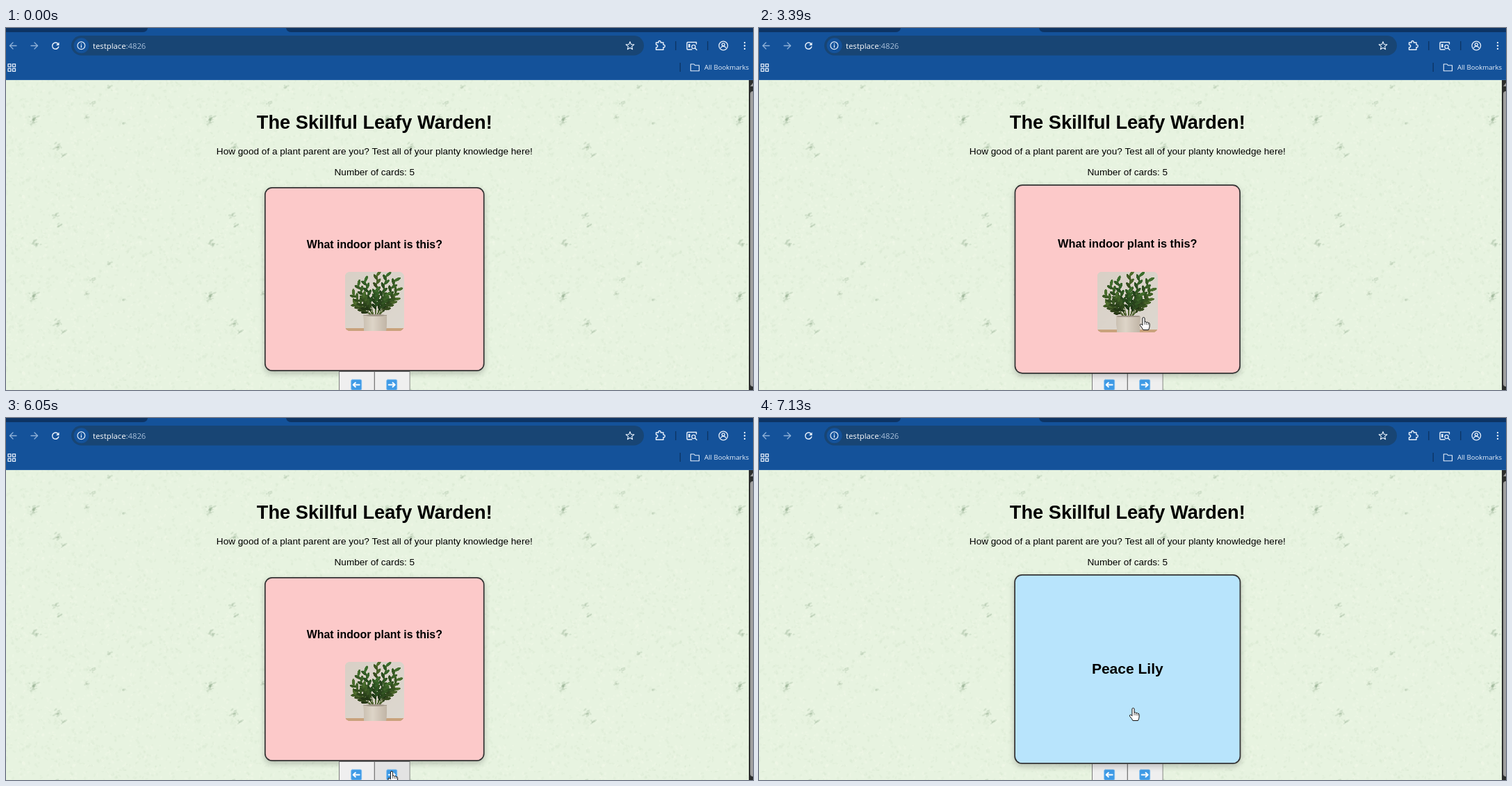
Recreate the animation shown at these times as an HTML page with a canvas. Size 1075 px wide and 521 px high, loop 8000 ms.

```html
<!DOCTYPE html>
<html lang="en">
<head>
<meta charset="utf-8">
<title>Plant quiz</title>
<style>
html, body { margin: 0; width: 100%; height: 100%; overflow: hidden; background: #e7f3e0; }
canvas { display: block; width: 1075px; height: 521px; }
</style>
</head>
<body>
<canvas id="stage" width="1075" height="521"></canvas>
<script>
const W = 1075, H = 521, LOOP = 8000, TAU = Math.PI * 2;
const SANS = '"Liberation Sans", Arial, sans-serif';
const UI = '"Open Sans", "Noto Sans", sans-serif';
const stage = document.getElementById('stage').getContext('2d');
let g = stage;

function seeded(seed) {
  return () => {
    seed = (seed * 1664525 + 1013904223) >>> 0;
    return seed / 4294967296;
  };
}
function layer(w, h, draw) {
  const c = document.createElement('canvas');
  c.width = w; c.height = h;
  const prev = g;
  g = c.getContext('2d');
  draw();
  g = prev;
  return c;
}
function rect(x, y, w, h, fill) { g.fillStyle = fill; g.fillRect(x, y, w, h); }
function roundPath(x, y, w, h, r) { g.beginPath(); g.roundRect(x, y, w, h, r); }
function ellipse(x, y, rx, ry, rot, fill) {
  g.beginPath();
  g.ellipse(x, y, rx, ry, rot, 0, TAU);
  g.fillStyle = fill;
  g.fill();
}
function line(color, width, ...pts) {
  g.beginPath();
  for (let i = 0; i < pts.length; i += 2) g.lineTo(pts[i], pts[i + 1]);
  g.strokeStyle = color; g.lineWidth = width;
  g.stroke();
}
function ring(x, y, r, color, width, from = 0, to = TAU) {
  g.beginPath();
  g.arc(x, y, r, from, to);
  g.strokeStyle = color; g.lineWidth = width;
  g.stroke();
}
function text(str, x, y, font, color = '#000', align = 'center') {
  g.font = font; g.fillStyle = color; g.textAlign = align;
  g.fillText(str, x, y);
}
function shape(path, fill, stroke, width) {
  const p = new Path2D(path);
  if (fill) { g.fillStyle = fill; g.fill(p); }
  if (stroke) { g.strokeStyle = stroke; g.lineWidth = width; g.stroke(p); }
}

// Paper texture, repeated every TILE pixels
const TILE = 254;
function drawPaper() {
  const rnd = seeded(12);
  rect(0, 0, TILE, TILE, '#e7f3e0');
  for (let i = 0; i < 1500; i++) {
    const tint = rnd() < .5 ? 'rgba(255,255,245,.16)' : 'rgba(190,215,185,.13)';
    ellipse(rnd() * TILE, rnd() * TILE, 1 + rnd() * 2, .8 + rnd() * 1.5, rnd() * 3, tint);
  }
  // x, y, spread, specks
  const spots = [[40, 132, 8, 24], [124, 108, 5, 7], [116, 128, 3, 4], [73, 172, 7, 11],
    [83, 182, 4, 5], [148, 85, 4, 5], [72, 16, 6, 8], [76, 30, 5, 6], [44, 59, 9, 12], [168, 138, 2, 2]];
  for (const [x, y, spread, count] of spots)
    for (let i = 0; i < count; i++) {
      const a = rnd() * TAU, d = rnd() * spread;
      ellipse(x + Math.cos(a) * d, y + Math.sin(a) * d, 1 + rnd() * 2.2, .7 + rnd(), -.8 + rnd() * .7,
        'rgba(150,175,145,.24)');
    }
}

function drawBrowser() {
  const bar = '#14529a', strip = '#0d3464', white = '#e8f0fa', dim = '#8fb1d8', sep = '#0d3768';
  rect(0, 0, W, 75, bar);
  shape('M0 0H204Q203 6 196 6H0Z', strip);
  shape(`M403 0H${W}V6H411Q404 6 403 0Z`, strip);
  rect(0, 74, W, 1, '#2a64a8');
  roundPath(94, 11, 824, 28.5, 14.2);
  g.fillStyle = '#184574';
  g.fill();
  ellipse(108.5, 25.3, 11, 11, 0, bar);

  g.lineCap = g.lineJoin = 'round';
  line(dim, 1.3, 15, 25.5, 5.5, 25.5);
  line(dim, 1.3, 10, 21, 5.5, 25.5, 10, 30);
  line(dim, 1.3, 36, 25.5, 45.5, 25.5);
  line(dim, 1.3, 41, 21, 45.5, 25.5, 41, 30);
  ring(71.3, 25.7, 4.6, white, 1.5, .3, TAU - .75);
  shape('M76.5 20.5V25H72Z', white);
  ring(108.3, 25.3, 5.4, white, 1.2);
  rect(107.7, 24.5, 1.3, 3.8, white);
  rect(107.7, 22.2, 1.3, 1.3, white);
  text('testplace', 125, 29.5, '11.3px ' + UI, '#fff', 'left');
  text(':4826', 125 + g.measureText('testplace').width, 29.5, '11.3px ' + UI, '#a9c0da', 'left');

  g.beginPath();
  for (let i = 0; i < 10; i++) {
    const a = -Math.PI / 2 + i * Math.PI / 5, r = i % 2 ? 2.7 : 6.2;
    g.lineTo(898 + Math.cos(a) * r, 25.8 + Math.sin(a) * r);
  }
  g.closePath();
  g.strokeStyle = white; g.lineWidth = 1.1;
  g.stroke();

  shape('M935.5 21H939Q938.6 18.5 940.5 18.5T942.3 21H946V24.2Q948.3 24 948.3 26T946 27.8V31.3H935.5V28Q937.7 28 937.7 26T935.5 24Z',
    null, white, 1.4);
  shape('M987 31H981Q980 31 980 30V21.5Q980 20.5 981 20.5H993.5V23', null, white, 1.4);
  rect(982, 23, 2.5, 5, white);
  ring(989.5, 27, 2.6, white, 1.3);
  line(white, 1.4, 991.5, 29, 994, 31.5);
  rect(963, 19, 1.5, 13, sep);
  rect(1009, 19, 1.5, 13, sep);
  ring(1032.3, 25.5, 6.3, white, 1.3);
  ring(1032.3, 23.8, 2, white, 1.3);
  ring(1032.3, 31, 4.6, white, 1.3, Math.PI * 1.2, Math.PI * 1.8);
  for (let i = -1; i < 2; i++) ellipse(1063, 25.5 + i * 4.4, 1.2, 1.2, 0, white);

  for (const x of [3, 9.5]) for (const y of [51.8, 58.3]) {
    g.strokeStyle = white; g.lineWidth = 1.3;
    g.strokeRect(x, y, 4, 4);
  }
  rect(969.5, 50, 1.5, 13, sep);
  shape('M985.3 52H990L991.5 53.7H997.5V61.7H985.3Z', null, white, 1.1);
  text('All Bookmarks', 1005, 60.2, '9.6px ' + UI, white, 'left');
}

const backdrop = layer(W, H, () => {
  const paper = layer(TILE, TILE, drawPaper);
  g.fillStyle = g.createPattern(paper, 'repeat');
  g.fillRect(0, 0, W, H);
  drawBrowser();
  rect(1069, 75, 6, H - 75, '#2b2d2c');
  shape('M1071 84L1075 79V84Z', '#9c9c9c');
  roundPath(1071, 91, 8, 425, 4);
  g.fillStyle = '#9f9f9f';
  g.fill();
  text('The Skillful Leafy Warden!', 530.3, 145, 'bold 27.2px ' + SANS);
  text('How good of a plant parent are you? Test all of your planty knowledge here!', 530.3, 182, '13.6px ' + SANS);
  text('Number of cards: 5', 530.3, 211.7, '13.6px ' + SANS);
});

// Photos, 85 px square around the origin
function leafyStem(tx, ty, hue) {
  const x0 = tx * .15 + 1, y0 = 21, a = Math.atan2(ty - y0, tx - x0);
  line('#4c5f2c', 1.2, x0, y0, tx, ty);
  for (let i = 0; i < 8; i++) {
    const k = .3 + i * .095, side = i % 2 ? 1 : -1, b = a + side * .65;
    ellipse(x0 + (tx - x0) * k + Math.cos(b) * 3.4, y0 + (ty - y0) * k + Math.sin(b) * 3.4,
      5, 2.1, b, `hsl(${hue},42%,${15 + i * 1.6 + (side > 0 ? 4 : 0)}%)`);
  }
}
function pottedStems() {
  const wall = g.createLinearGradient(-43, -43, 43, 43);
  wall.addColorStop(0, '#d9d0c6');
  wall.addColorStop(1, '#ddd8d0');
  rect(-43, -43, 86, 86, wall);
  rect(-43, 38.5, 86, 5, '#c9a27c');
  const tips = [[-29, 3], [-31, -11], [-24, -25], [-14, -31], [30, -4], [34, -18], [31, -32],
    [18, -39], [4, -40], [-16, -8], [17, -10], [2, -16]];
  tips.forEach(([x, y], i) => leafyStem(x, y, 88 + i % 4 * 6));
  const pot = g.createLinearGradient(-17, 0, 19, 0);
  pot.addColorStop(0, '#c9bfb1');
  pot.addColorStop(.4, '#ded5c8');
  pot.addColorStop(1, '#bfb3a4');
  shape('M-16 20H18L17 43H-15Z', pot);
  ellipse(1, 20, 17, 1.3, 0, '#a2978a');
}
function floweringBush() {
  const rnd = seeded(7);
  rect(-43, -43, 86, 86, '#aaa58a');
  rect(-43, 28, 86, 15, '#c8c1ac');
  shape('M-15 26H11L8 43H-12Z', '#f1f1ed');
  ellipse(0, 6, 24, 21, 0, '#24451c');
  for (let i = 0; i < 150; i++) {
    const a = rnd() * TAU, d = 8 + rnd() * 29;
    ellipse(Math.cos(a) * d, 3 + Math.sin(a) * d * .85, 6.5, 1.9, a + rnd() * .6 - .3,
      `hsl(${100 + rnd() * 14},${38 + rnd() * 14}%,${15 + rnd() * 22}%)`);
  }
  const blooms = [[-25, -34], [-13, -36], [4, -38], [22, -31], [17, -37], [-32, -23], [-5, -24],
    [8, -9], [34, -10], [-17, -8], [-33, 8], [5, -14], [20, -12]];
  blooms.forEach(([x, y], i) => {
    const s = y < -28 ? 1.35 : .8;
    ellipse(x, y, 5 * s, 2.3 * s, -1.1 + (i % 3 - 1) * .45, '#eef0e8');
    line('#c9cda7', .8, x, y + 2, x + 1, y - 2);
  });
}

const CARDS = [
  { fill: '#fcc9c9', ask: 'What indoor plant is this?', answer: 'ZZ Plant', photo: pottedStems },
  { fill: '#b8e4fc', ask: 'Guess this flowering plant.', answer: 'Peace Lily', photo: floweringBush }
];
for (const c of CARDS) c.image = layer(340, 340, () => {
  g.scale(4, 4);
  g.translate(42.5, 42.5);
  roundPath(-42.5, -42.5, 85, 85, 6.8);
  g.clip();
  c.photo();
});

// Pointer stops: time, x, y, kind
const POINTER = [
  [0], [770, 760, 513, 'arrow'], [840, 676, 514, 'arrow'], [900],
  [1630, 577, 514, 'arrow'], [1700, 568, 513, 'hand'], [1770, 564, 512, 'hand'], [1840, 562, 511, 'hand'],
  [1910, 561, 511, 'hand'], [2590, 557, 511, 'hand'], [2660, 554, 510, 'hand'],
  [3120, 554, 500, 'hand'], [3190, 555, 455, 'hand'], [3260, 554, 425, 'hand'], [3330, 553.5, 417, 'hand'],
  [5520, 554, 446, 'hand'], [5590, 555, 503, 'hand'], [5650, 555, 509, 'hand'],
  [6530, 553, 500, 'hand'], [6600, 545, 450, 'hand'], [6660, 541, 425, 'hand'], [6730, 538.5, 418, 'hand']
];
const PRESSES = [[3920, 4130], [4920, 5120], [6120, 6340], [6930, 7130]];
const between = (t, a, b) => t >= a && t < b;

function ease(x) {
  if (x <= 0 || x >= 1) return Math.min(1, Math.max(0, x));
  const bez = (u, p, q) => 3 * u * (1 - u) ** 2 * p + 3 * u * u * (1 - u) * q + u ** 3;
  let lo = 0, hi = 1;
  for (let i = 0; i < 20; i++) {
    const mid = (lo + hi) / 2;
    if (bez(mid, .25, .25) < x) lo = mid; else hi = mid;
  }
  return bez(lo, .1, 1);
}
// Hover progress advances at about 15 steps per second
function grow(t, start) {
  const step = 200 / 3;
  return ease(Math.floor((t - start + 8) / step) * step / 300);
}
function cardScale(t) {
  return 1 + .03 * (t < 5590 ? grow(t, 3190) : t < 6600 ? 1 - grow(t, 5590) : grow(t, 6600));
}

function button(x, dir, hover) {
  rect(x, 494, 51.5, 30, '#6f6f6f');
  rect(x + .9, 495, 49.8, 30, hover ? '#e3e3e3' : '#efefef');
  const cx = x + 25.2, cy = 513.5;
  roundPath(cx - 7.5, cy - 7.5, 15, 15, 1.8);
  g.fillStyle = '#3f9be6';
  g.fill();
  g.strokeStyle = '#7dbdf0'; g.lineWidth = .8;
  g.stroke();
  g.lineCap = g.lineJoin = 'round';
  line('#fff', 1.9, cx - dir * 4.5, cy, cx + dir * 4, cy);
  line('#fff', 1.9, cx + dir * 1.3, cy - 3, cx + dir * 4.5, cy, cx + dir * 1.3, cy + 3);
}
function buttons(t) {
  button(479, -1, false);
  button(530, 1, between(t, 1700, 3190) || between(t, 5590, 6600));
}

function drawCard(t) {
  const card = CARDS[t < 6340 ? 0 : 1];
  const flipped = between(t, 4130, 5120) || t >= 7130;
  const s = cardScale(t);
  g.save();
  g.translate(530.3, 361.5);
  g.scale(s, s);
  g.save();
  g.shadowColor = 'rgba(0,0,0,.22)';
  g.shadowBlur = 9;
  g.shadowOffsetY = 3.4;
  roundPath(-158.3, -132.5, 316.6, 265, 11);
  g.fillStyle = '#333';
  g.fill();
  g.restore();
  roundPath(-156.6, -130.8, 313.2, 261.6, 9.3);
  g.fillStyle = card.fill;
  g.fill();
  if (flipped) {
    text(card.answer, 0, 6.6, 'bold 20.4px ' + SANS);
  } else {
    text(card.ask, 0, -44.2, 'bold 15.9px ' + SANS);
    g.drawImage(card.image, -42.5, -10.5, 85, 85);
  }
  g.restore();
}

function drawPointer(t) {
  const [, x, y, kind] = POINTER.findLast(p => t >= p[0]);
  if (!kind) return;
  if (PRESSES.some(([a, b]) => between(t, a, b))) ring(x, y - 1, 9.7, '#333', 1);
  g.save();
  g.translate(x, y);
  g.lineJoin = 'round';
  if (kind === 'arrow') {
    shape('M0 0V15L3.6 11.8L6 17.3L8.2 16.3L5.8 11H10.7Z', '#fff', '#000', 1);
  } else {
    shape('M-1.6 10V1Q-1.4 -.6 0 -.6T1.6 1V6Q3.6 5 4.2 6.6Q6 5.8 6.6 7.3Q8.4 6.8 8.6 8.8V12.2Q8.4 14.6 7 17.5H-.6Q-1.8 14.6-5 11.2Q-5.6 9.4-4 9.2Q-2.8 9.2-1.6 10.6Z',
      '#fff', '#111', 1);
    line('#111', .7, 1.6, 6, 1.6, 9.5);
    line('#111', .7, 4.2, 6.8, 4.2, 9.8);
    line('#111', .7, 6.6, 7.5, 6.6, 10);
  }
  g.restore();
}

function frame(now) {
  const t = now % LOOP;
  g.drawImage(backdrop, 0, 0);
  if (cardScale(t) > 1) {
    buttons(t);
    drawCard(t);
  } else {
    drawCard(t);
    buttons(t);
  }
  drawPointer(t);
  requestAnimationFrame(() => frame(performance.now() - start));
}
const start = performance.now();
frame(0);
</script>
</body>
</html>
```
